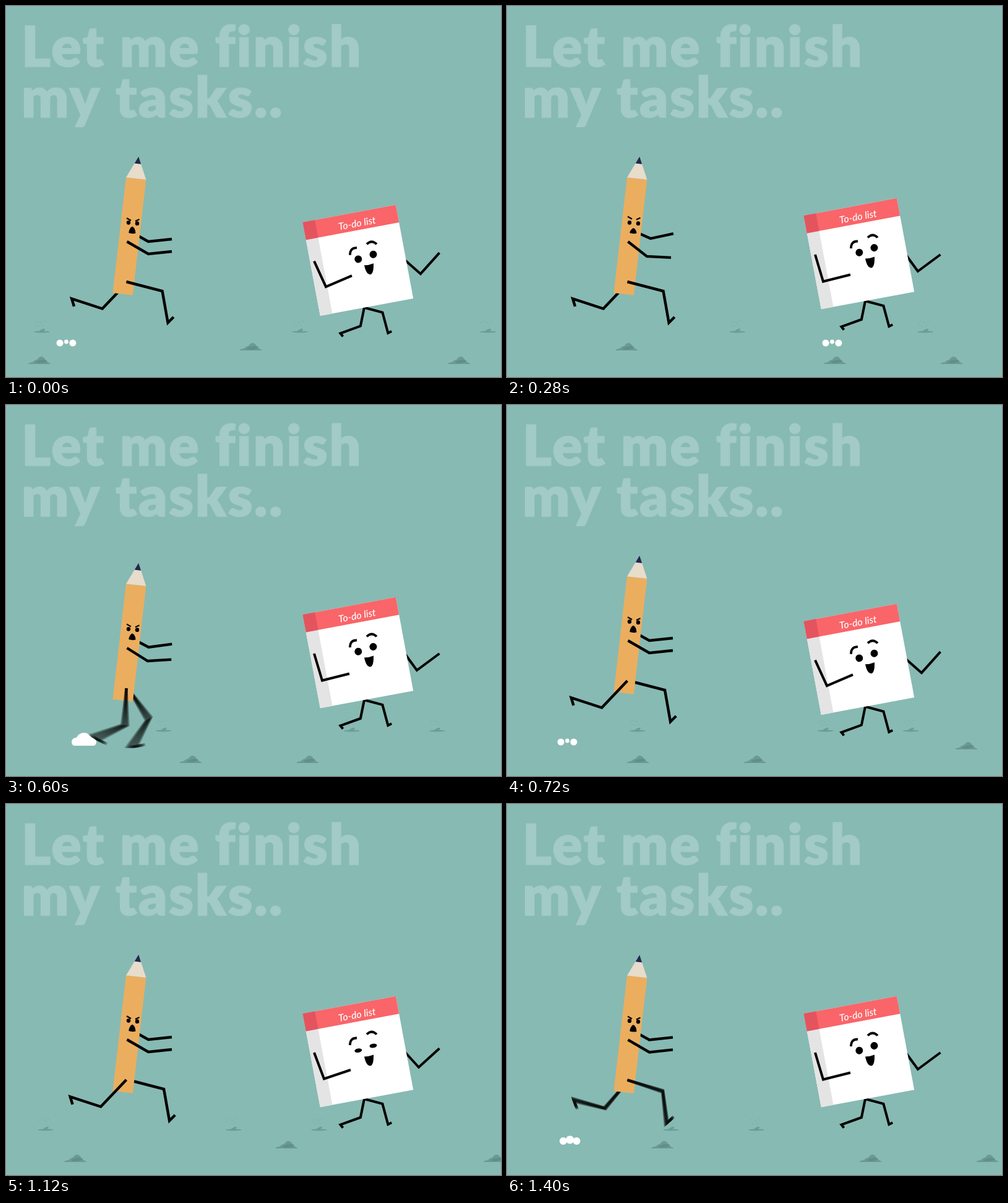
Write an HTML page with a canvas that moves like this. It is 800x600 px and loops after 1440 ms.

```html
<!DOCTYPE html>
<html lang="en">
<head>
<meta charset="utf-8">
<title>Let me finish my tasks</title>
<style>
  html, body { margin: 0; width: 100%; height: 100%; overflow: hidden; background: #87bab3; }
  canvas { display: block; }
</style>
</head>
<body>
<canvas id="stage" width="800" height="600"></canvas>
<script>
const ctx = document.getElementById('stage').getContext('2d');
const LOOP = 1440, TICK = 40, STRIDE = 720;
const TOUCHDOWN = 160, LANDED = 265;

const clamp = v => Math.max(0, Math.min(1, v));
const ease = v => { v = clamp(v); return v * v * (3 - 2 * v); };
const mod = (a, n) => ((a % n) + n) % n;
const blink = (t, centre) => clamp(1 - Math.abs(t - centre) / 80);

function at(x, y, angle, draw) {
  ctx.save();
  ctx.translate(x, y);
  ctx.rotate(angle);
  draw();
  ctx.restore();
}
function box(color, x, y, w, h) {
  ctx.fillStyle = color;
  ctx.fillRect(x, y, w, h);
}
function oval(color, x, y, rx, ry = rx, tilt = 0, from = 0) {
  ctx.beginPath();
  ctx.ellipse(x, y, rx, ry, tilt, from, Math.PI * 2);
  ctx.fillStyle = color;
  ctx.fill();
}
function shape(color, path) {
  ctx.fillStyle = color;
  ctx.fill(new Path2D(path));
}
function line(width, ...points) {
  ctx.beginPath();
  for (let i = 0; i < points.length; i += 2) ctx.lineTo(points[i], points[i + 1]);
  ctx.strokeStyle = '#000';
  ctx.lineWidth = width;
  ctx.stroke();
}

function drawTitle() {
  ctx.font = '900 90px Lato, sans-serif';
  ctx.letterSpacing = '2.5px';
  ctx.textAlign = 'left';
  ctx.fillStyle = ctx.strokeStyle = '#a2cac7';
  ctx.lineWidth = 1.5;
  ['Let me finish', 'my tasks..'].forEach((text, i) => {
    ctx.fillText(text, 25, 97.5 + 82 * i);
    ctx.strokeText(text, 25, 97.5 + 82 * i);
  });
  ctx.letterSpacing = '0px';
}

// Scenery
function drawPlant(x) {
  at(x, 527, 0, () => {
    oval('#6b9d97', 0, 0, 13, 1.4);
    oval('#6b9d97', 0, -2, 5.5, 2, -.5);
    for (let i = 0; i < 7; i++)
      box('rgba(90,140,133,.3)', i * 2.6 - 12, -14 - 4 * Math.sin(i * 2.3), 2, 1);
  });
}
function drawRock(x, y) {
  for (let i = 0; i < 3; i++)
    oval('#6b9a95', x + i * 1.5, y, 18 - 5 * i, 4 + 4 * i, 0, Math.PI);
  oval('#618e89', x + 3, y - 4, 9, 2.5, -.15);
}
function drawGround(t) {
  const scroll = (x, speed, span) => mod(x - t * speed + 30, span) - 30;
  for (const x of [58, 475, 779]) drawPlant(scroll(x, .367, 859));
  for (const x of [54, 732]) drawRock(scroll(x, .7225, 867), 579);
  drawRock(scroll(395.5, .7225, 867), 557);
}
function drawDust(p, x) {
  const age = p - TOUCHDOWN;
  if (age < -TICK || age > 150) return;
  const grow = clamp(1 + age / TICK), drift = 1 - Math.exp(-Math.max(age, 0) / 60);
  ctx.save();
  ctx.beginPath();
  ctx.rect(0, 500, 800, 51);
  ctx.clip();
  for (let i = 0; i < 3; i++) {
    const r = i === 1 ? 13 - .08 * age : 7 - .012 * age;
    oval('#fff', x + 13 * (i - 1) - (30 + 3 * i) * drift, 545 - (i === 1 ? 2 : 0), Math.max(0, r) * grow);
  }
  ctx.restore();
}

// Running: bones are [length, angle in front, angle behind]
const PENCIL_LEG = [[60, 14.5, 133.5], [52, 80, 198], [13, -45, 73]];
const CARD_LEG = [[30.5, 15, 101.5], [34.5, 75, 160], [6.5, -27, 51]];

const dip = p => 1 - ease((p - TOUCHDOWN) / 90);

function leg(width, x, y, bones, swing) {
  const points = [x, y];
  for (const [length, front, back] of bones) {
    const angle = (front + (back - front) * swing) * Math.PI / 180;
    points.push(x += length * Math.cos(angle), y += length * Math.sin(angle));
  }
  line(width, ...points);
}
function runLeg(width, x, y, bones, p, backward) {
  const moving = p > 0 && p < LANDED;
  ctx.globalAlpha = moving ? .25 : 1;
  for (let lag = moving ? -8 : 0; lag <= (moving ? 8 : 0); lag += 2) {
    const swing = ease((p - lag) / LANDED);
    leg(width, x, y, bones, backward ? swing : 1 - swing);
  }
  ctx.globalAlpha = 1;
}

function drawPencil(t) {
  const p = mod(t - 440, STRIDE);
  const nearGoesBack = t >= 440 && t < 440 + STRIDE;
  const reach = ease(t / 300) - ease((t - 400) / 300);

  drawDust(p, 126);
  ctx.save();
  ctx.translate(0, 12 * dip(p));
  runLeg(4.4, 197, 446, PENCIL_LEG, p, !nearGoesBack);
  line(4.4, 205, 367 - 3 * reach, 230 + 2 * reach, 381 - 5 * reach, 268 + reach, 377 - 9 * reach);

  at(210.2, 279, .1145, () => {
    box('#ebae5f', -16.3, 0, 32.6, 188);
    shape('#e8dccb', 'M-16.3 0L0 -35.7L16.3 0Z');
    shape('#1f2a4d', 'M-5.3 -24L0 -35.7L5.3 -24Z');
  });

  const squint = 3.4 * (1 - .75 * blink(t, 160)), lift = 2.5 * reach, top = 356.5 + lift;
  oval('#000', 198, 350.3, 3.2, squint);
  oval('#000', 212, 351.7, 3.2, squint);
  line(2.2, 195, 343 - lift, 202, 347 - lift);
  line(2.2, 209, 348 - lift, 215.5, 345 - lift);
  shape('#000', `M198.3 367Q199 ${top + 3} 204 ${top}Q209 ${top + 2} 209.5 367.5Q204 369 198.3 367Z`);

  line(4.4, 195.5, 381, 230 - 4 * reach, 401 + 4 * reach, 268 - 3 * reach, 397 + 10 * reach);
  runLeg(4.4, 194.5, 446, PENCIL_LEG, p, nearGoesBack);
  ctx.restore();
}

function drawCard(t) {
  const p = mod(t, STRIDE), beat = mod(t, STRIDE / 2);
  const wave = clamp(Math.min(beat / 80, (360 - beat) / 40));
  const shut = blink(p, 440), open = 6 * (1 - .9 * shut);

  drawDust(p, 554);
  ctx.save();
  ctx.translate(0, 10.7 * dip(p));
  runLeg(4, 579, 477, CARD_LEG, p, false);
  runLeg(4, 579, 477, CARD_LEG, p, true);
  line(4, 640, 396, 670 - 6 * wave, 422.5 + 6.5 * wave, 700.5, 388.5 + 13.5 * wave);

  at(479.5, 339, -.185, () => {
    box('#fff', 0, 0, 153, 154);
    box('#e4e4e4', 0, 29, 20, 125);
    box('#f96569', 0, 0, 153, 29);
    box('#e3545f', 0, 0, 20, 29);
    ctx.font = 'italic 500 16px Lato, sans-serif';
    ctx.textAlign = 'center';
    ctx.fillStyle = '#fff';
    ctx.fillText('To-do list', 86, 23.5);
  });

  oval('#000', 569.3, 398.7, 6, open, -.15);
  oval('#000', 593.5, 391, 6, open, -.15);
  at(0, -4 * shut, 0, () => {
    ctx.lineWidth = 3.8;
    ctx.stroke(new Path2D('M556 392Q556 380 567 380.5M583 374.5Q591 366.5 599 374.5'));
  });
  shape('#000', 'M579 408.5Q587 408.5 594 405.5Q594.5 422 589 423.5Q582 423.5 579 408.5Z');

  line(4, 498, 402, 517 - 6 * wave, 443.5 + 2 * wave, 559 - 4 * wave, 425.5 + 9 * wave);
  ctx.restore();
}

function render(now) {
  const t = Math.floor((now % LOOP) / TICK) * TICK;
  box('#87bab3', 0, 0, 800, 600);
  drawTitle();
  drawGround(t);
  drawPencil(t);
  drawCard(t);
}

let start;
function tick(now) {
  start ??= now;
  render(now - start);
  requestAnimationFrame(tick);
}
render(0);
requestAnimationFrame(tick);
</script>
</body>
</html>
```
